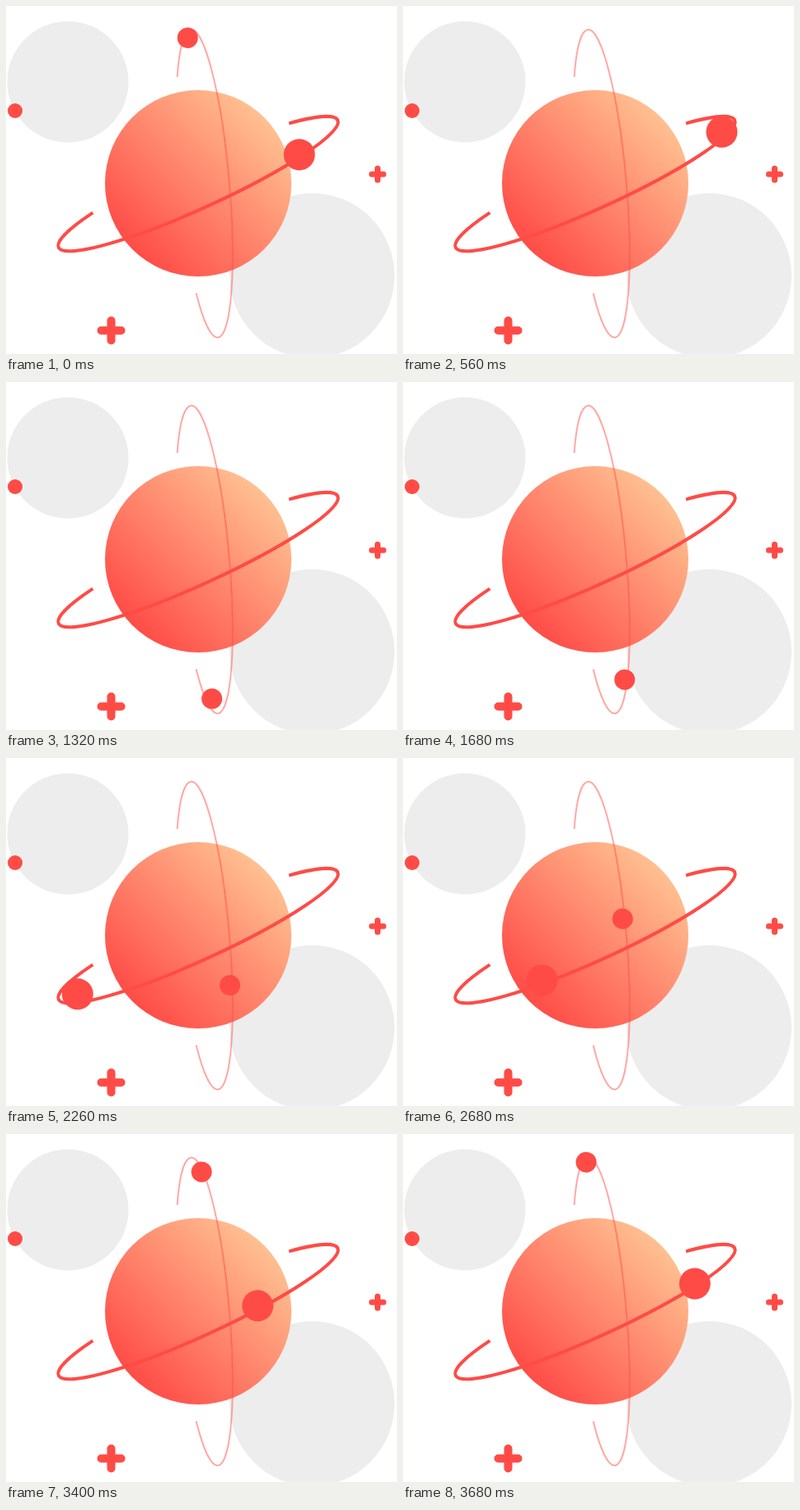
Write an HTML page with a canvas that moves like this. It is 474 by 422 pixels and loops after 3.7 s.

```html
<!DOCTYPE html>
<html lang="en">
<head>
<meta charset="utf-8">
<title>Planet with two moons</title>
<style>
  html, body { margin: 0; width: 100%; height: 100%; overflow: hidden; background: #fff; }
  canvas { display: block; }
</style>
</head>
<body>
<canvas id="stage" width="474" height="422"></canvas>
<script>
const ctx = document.getElementById('stage').getContext('2d');
const RED = '#ff4b46', GREY = '#ededed';
const LOOP = 3700, STEP = 20;
const RAD = Math.PI / 180;
const planet = { x: 233, y: 215, r: 113 };

const linear = s => s;
const smooth = s => s * s * (3 - 2 * s);

// Orbits: half length, half widths in front of and behind the planet, and the
// profile that tapers the width towards the tips. Phase keys are [ms, degrees];
// 0 degrees is the upper tip, 0 to 180 the far side, 180 to 360 the near side.
const moons = [
  { r: 19, x: 236.7, y: 213.5, tilt: -24.5, length: 172.5, front: 24, back: 14, profile: smooth,
    phase: [[0, -45], [560, -20.6], [1000, 36.6], [2260, 195], [2720, 244], [3100, 269], [3680, 314]] },
  { r: 12.5, x: 240.7, y: 212, tilt: -95, length: 181, front: 27, back: 20, profile: linear,
    phase: [[0, 15.4], [1000, 115], [1680, 213.6], [2260, 248.6], [3100, 305], [3680, 369]] }
];

function slope(keys, i) {
  const a = keys[Math.max(i - 1, 0)], b = keys[Math.min(i + 1, keys.length - 1)];
  return (b[1] - a[1]) / (b[0] - a[0]);
}

// Cubic Hermite interpolation between unevenly timed keys.
function interpolate(keys, t) {
  let i = 0;
  while (i < keys.length - 2 && t >= keys[i + 1][0]) i++;
  const [t0, v0] = keys[i], [t1, v1] = keys[i + 1], span = t1 - t0;
  const u = (t - t0) / span, w = 1 - u;
  return v0 + (v1 - v0) * smooth(u) +
    span * u * w * (w * slope(keys, i) - u * slope(keys, i + 1));
}

function disc(x, y, r, fill) {
  ctx.fillStyle = fill;
  ctx.beginPath();
  ctx.arc(x, y, r, 0, 2 * Math.PI);
  ctx.fill();
}

function plus(x, y, size, thick) {
  ctx.fillStyle = RED;
  ctx.beginPath();
  ctx.roundRect(x - size / 2, y - thick / 2, size, thick, thick / 2);
  ctx.roundRect(x - thick / 2, y - size / 2, thick, size, thick / 2);
  ctx.fill();
}

function ring(x, y, a, b, tilt, width, alpha) {
  ctx.globalAlpha = alpha;
  ctx.strokeStyle = RED;
  ctx.lineWidth = width;
  ctx.beginPath();
  ctx.ellipse(x, y, a, b, tilt * RAD, -45.4 * RAD, 225.4 * RAD);
  ctx.stroke();
  ctx.globalAlpha = 1;
}

function clipOutsidePlanet() {
  ctx.beginPath();
  ctx.rect(0, 0, 474, 422);
  ctx.arc(planet.x, planet.y, planet.r, 0, 2 * Math.PI);
  ctx.clip('evenodd');
}

function drawMoon(moon, t) {
  const angle = interpolate(moon.phase, t) * RAD;
  const depth = Math.sin(angle), behind = depth > 0;
  const width = moon.profile(Math.abs(depth));
  ctx.save();
  if (behind) clipOutsidePlanet();
  ctx.translate(moon.x, moon.y);
  ctx.rotate(moon.tilt * RAD);
  disc(moon.length * Math.cos(angle), width * (behind ? -moon.back : moon.front), moon.r, RED);
  ctx.restore();
}

const glow = ctx.createLinearGradient(153, 295, 313, 135);
glow.addColorStop(0, '#ff4c47');
glow.addColorStop(1, '#ffc091');

function draw(t) {
  ctx.fillStyle = '#fff';
  ctx.fillRect(0, 0, 474, 422);
  disc(75, 92, 73.5, GREY);
  disc(371, 327, 100, GREY);
  disc(11, 127, 9, RED);
  plus(127.5, 393.5, 34, 10);
  plus(450.5, 204, 21, 7);
  disc(planet.x, planet.y, planet.r, glow);
  ring(240.5, 215.3, 187.4, 30.2, -95, 2, 0.48);
  ring(232.9, 215.6, 186, 29.5, -24.5, 4, 1);
  moons.forEach(moon => drawMoon(moon, t));
}

const start = performance.now();
function tick() {
  const t = (performance.now() - start) % LOOP;
  draw(t < 2 * STEP ? 0 : Math.floor(t / STEP) * STEP);
  requestAnimationFrame(tick);
}
tick();
</script>
</body>
</html>
```
